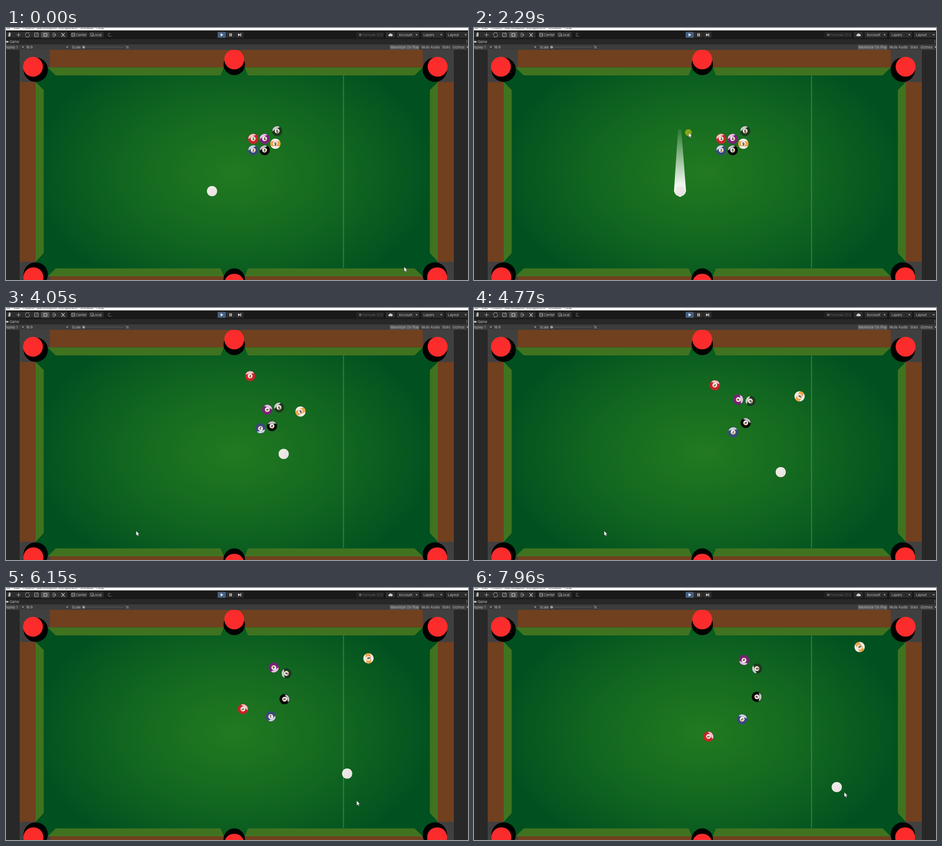
These frames come from a looping animation (1012 by 553 pixels, 7.99 s). An HTML page:

```html
<!DOCTYPE html>
<html lang="en">
<head>
<meta charset="utf-8">
<title>Pool table</title>
<style>
  html, body { margin: 0; width: 100%; height: 100%; overflow: hidden; background: #282828; }
  svg { display: block; width: 100vw; height: 100vh; }
  text { font-family: Inter, "Open Sans", sans-serif; }
  .ui { font-size: 7.5px; }
  .num { font-size: 7px; font-weight: 700; text-anchor: middle; fill: #151515; }
</style>
</head>
<body>
<svg viewBox="0 0 1012 553" preserveAspectRatio="none">
  <defs>
    <radialGradient id="felt" gradientUnits="userSpaceOnUse" r="1" cx="0" cy="0" gradientTransform="translate(500 317) scale(450 300)">
      <stop offset="0" stop-color="#227a20"/>
      <stop offset=".5" stop-color="#136820"/>
      <stop offset="1" stop-color="#005020"/>
    </radialGradient>
    <linearGradient id="gloss" x1="0" y1="0" x2=".7" y2="1">
      <stop offset="0" stop-color="#fff" stop-opacity=".5"/>
      <stop offset=".4" stop-color="#fff" stop-opacity=".8"/>
      <stop offset="1" stop-color="#fff" stop-opacity=".25"/>
    </linearGradient>
    <linearGradient id="disc" x1="0" y1="0" x2="1" y2="1">
      <stop offset=".5" stop-color="#faf3ea"/>
      <stop offset="1" stop-color="#eeb36c"/>
    </linearGradient>
    <linearGradient id="cueFill" x1="0" y1="0" x2="1" y2="1">
      <stop offset="0" stop-color="#f1eeec"/>
      <stop offset="1" stop-color="#e6e0de"/>
    </linearGradient>
    <linearGradient id="fade">
      <stop offset="0" stop-color="#fff"/>
      <stop offset=".2" stop-color="#fff" stop-opacity=".92"/>
      <stop offset="1" stop-color="#fff" stop-opacity=".08"/>
    </linearGradient>
    <clipPath id="round"><circle r="11.2"/></clipPath>
  </defs>
  <g id="table"></g>
  <g id="editor"></g>
  <path id="aim" fill="url(#fade)"/>
  <g id="balls"></g>
  <circle id="dot" r="7.4" fill="#86a616"/>
  <path id="cursor" d="M0 0V10.6L2.4 8.4L4.1 12.1L5.8 11.3L4.2 7.7H7.4Z" fill="#fff" stroke="#111" stroke-width=".5"/>
</svg>
<script>
const LOOP = 7990, DRAG = 0.00047;      // drag per ms
const PRESS = 1060, RELEASE = 3278;
const CUE = { x: 451.3, y: 358 };
const TOP_WALL = 115.5, BOUNCE = 0.81;
const $ = id => document.getElementById(id);

function add(parent, tag, attrs, text) {
  const el = document.createElementNS('http://www.w3.org/2000/svg', tag);
  for (const k in attrs) el.setAttribute(k, attrs[k]);
  if (text) el.textContent = text;
  return parent.appendChild(el);
}
const rect = (p, x, y, width, height, fill, rx = 0) => add(p, 'rect', { x, y, width, height, fill, rx });
const circle = (p, cx, cy, r, fill) => add(p, 'circle', { cx, cy, r, fill });
const shape = (p, d, fill) => add(p, 'path', { d, fill });
const line = (p, d, stroke = '#b8b8b8', width = 1) =>
  add(p, 'path', { d, fill: 'none', stroke, 'stroke-width': width });

function drawTable(g) {
  const wood = '#70401f', cushion = '#40731f';
  rect(g, 0, 48, 1012, 505, '#282828');
  rect(g, 30, 48, 951, 505, '#404040');
  for (const y of [48, 545]) rect(g, 96, y, 817, 39, wood);
  for (const x of [30, 946]) rect(g, x, 118.5, 35, 394.5, wood);
  rect(g, 65, 86.5, 881, 458.5, 'url(#felt)');
  rect(g, 738, 104, 2.5, 423, 'rgba(255,255,255,.17)');

  for (const [outer, inner] of [[86.5, 104], [545, 527.5]])
    shape(g, `M91 ${outer}H477L470 ${inner}H109Z M523 ${outer}H913L895 ${inner}H530Z`, cushion);
  for (const [outer, inner] of [[65, 82.5], [946, 928.5]])
    shape(g, `M${outer} 118.5L${inner} 136V494L${outer} 513Z`, cushion);

  const pocket = (x, y, r, dx, dy) => {
    circle(g, x, y, r, '#000');
    circle(g, x + dx, y + dy, 21.8, '#fd2c2c');
  };
  for (const side of [-1, 1]) {
    const x = 502.2 + side * 437.2;
    pocket(x, 91.5, 26.7, side * 6, -6.5);
    pocket(x, 541, 26.7, side * 5, 6);
  }
  pocket(500, 80, 23.5, 0, -11);
  pocket(500, 551, 23.5, 0, 10);
}

function drawEditor(g) {
  const label = (x, y, s, fill = '#c0c0c0') => add(g, 'text', { x, y, class: 'ui', fill }, s);
  const arrow = (x, y) => shape(g, `M${x - 2.3} ${y - 1.2}h4.6l-2.3 2.6Z`, '#c0c0c0');
  const button = (x, w, fill = '#2d2d2d') => rect(g, x, 8.5, w, 13, fill, 1.5);
  const menu = (x, s) => { button(x, 49); label(x + 4.5, 17.7, s); arrow(x + 43.5, 15); };

  rect(g, 0, 0, 1012, 5.5, '#fff');
  label(-3, 2.2, 'File', '#222');
  label(17, 2.2, 'Edit', '#222');
  label(38, 2.2, 'Assets', '#222');
  label(67, 2.2, 'GameObject', '#222');
  label(115, 2.2, 'Component', '#222');
  label(163, 2.2, 'Window', '#222');
  label(198, 2.2, 'Help', '#222');
  rect(g, 0, 5.5, 1012, 19, '#191919');
  rect(g, 0, 24.5, 1012, 11.5, '#282828');
  rect(g, 0, 36, 1012, 12, '#3c3c3c');

  // transform tools
  button(0, 135);
  button(77, 18, '#505050');
  shape(g, 'M4 14l2 1v-5h4v7l-2 2H6Z', '#b8b8b8');
  line(g, 'M23 15h9M27.5 10.5v9');
  line(g, 'M43 16a4 4 0 0 1 7-4v-2M51 14a4 4 0 0 1-7 4v2');
  line(g, 'M62.5 11h8v8h-8ZM65 16.5l4-4');
  line(g, 'M83 12h6.5v6H83Z', '#ddd');
  line(g, 'M102 12a4 4 0 1 1 0 6M101 15h9');
  line(g, 'M121.5 11l7 8M128.5 11l-7 8', '#b8b8b8', 1.5);
  button(141, 38);
  line(g, 'M144 11.5h6.5v7H144ZM144 15h6.5');
  label(153, 17.7, 'Center');
  button(181, 33);
  line(g, 'M185 12.5l3-1.5 3 1.5v4l-3 2-3-2ZM188 14v4.5', '#b8b8b8', .8);
  label(190.5, 17.7, 'Local');
  line(g, 'M224 12h5M224 12v6h7', '#777');

  // play controls
  button(463.5, 18, '#466080');
  button(482.5, 18.5);
  button(502, 18.5);
  shape(g, 'M470 11.5l6 3.5-6 3.5Z', '#e4e4e4');
  line(g, 'M490.4 11.7v6.6M493.6 11.7v6.6', '#e4e4e4', 1.8);
  shape(g, 'M508.5 11.7l5 3.3-5 3.3ZM513.5 11.7h1.5v6.6h-1.5Z', '#e4e4e4');

  button(767, 60, '#222');
  circle(g, 776, 15, 3, '#5d5d5d');
  label(780.5, 17.7, 'Fernoak VCS', '#5d5d5d');
  button(832, 20);
  shape(g, 'M839.5 18a2 2 0 0 1 0-4 3 3 0 0 1 5.5-.5 2.3 2.3 0 0 1 .5 4.5Z', '#d0d0d0');
  menu(856, 'Account');
  menu(910, 'Layers');
  menu(963.5, 'Layout');

  // game tab and its toolbar
  add(g, 'ellipse', { cx: 2.5, cy: 30.3, rx: 3.2, ry: 2, fill: '#c0c0c0' });
  label(8, 33, 'Game');
  for (const y of [27.5, 30, 32.5]) circle(g, 1009.5, y, .7, '#c0c0c0');
  rect(g, 841, 36.5, 64, 11.5, '#505050');
  label(-5.5, 44.7, 'Display 1');
  label(44, 44.7, '16:9');
  label(144, 44.7, 'Scale');
  label(262, 44.7, '1x');
  label(842, 44.7, 'Maximize On Play');
  label(910, 44.7, 'Mute Audio');
  label(955, 44.7, 'Stats');
  label(978, 44.7, 'Gizmos');
  for (const x of [37, 134, 1011]) arrow(x, 42);
  line(g, 'M170 42H258', '#606060');
  circle(g, 170, 42, 3, '#999');
}

// A hit gives the time and how far the ball would roll from there until it stops
const BALLS = [
  { num: '3', color: '#c9232b', x: 541.5, y: 243, spin: 100, hits: [{ t: 3545, dx: -32, dy: -443 }] },
  { num: '4', color: '#79207a', x: 566.5, y: 243, spin: 258, hits: [{ t: 3560, dx: 28.5, dy: -97 }] },
  { num: '6', color: '#1d3820', x: 594, y: 226, spin: -95, hits: [{ t: 3740, dx: 30, dy: -57 }] },
  { num: '2', color: '#38497c', x: 541.5, y: 268, spin: -770,
    hits: [{ t: 3540, dx: 217, dy: -271 }, { t: 3620, dx: 43.5, dy: 34.5 }] },
  { num: '8', color: '#050505', x: 566.5, y: 268, spin: 140,
    hits: [{ t: 3595, dx: 274, dy: -157 }, { t: 3650, dx: 53, dy: -29 }] },
  { num: '9', color: '#eda44d', x: 590, y: 254, spin: -140, hits: [{ t: 3608, dx: 292.5, dy: -143 }] },
  { color: 'url(#cueFill)', ...CUE, spin: 0,
    hits: [{ t: RELEASE, dx: 739, dy: -587 }, { t: 3540, dx: 683, dy: -90 }, { t: 3600, dx: 274, dy: 171.5 }] }
];

function makeBall(ball) {
  const { num, color } = ball, striped = num === '9';
  const g = ball.el = add($('balls'), 'g', {});
  circle(g, 0, 0, 11.2, striped ? '#f4efe9' : color);
  if (striped) add(g, 'rect', { x: -12, y: -5.5, width: 24, height: 11, fill: color, 'clip-path': 'url(#round)' });
  if (!num) return;
  if (!striped) shape(g, 'M-10.5 1A10.5 10.5 0 0 1 6-8.7Q-1-5-10.5 1Z', 'url(#gloss)');
  circle(g, 0, 0, 5.3, 'url(#disc)');
  add(g, 'text', { class: 'num', y: 2.5 }, num);
  if (num === '6' || striped) line(g, 'M-2.2 3.6h4.4', '#151515', .7);
}

// Share of the full roll covered after some time under drag
const rolled = ms => 1 - Math.exp(-DRAG * Math.max(0, ms));

function placeBall({ el, x, y, spin, hits }, t) {
  hits.forEach(({ t: from, dx, dy }, i) => {
    const until = i + 1 < hits.length ? Math.min(t, hits[i + 1].t) : t;
    x += dx * rolled(until - from);
    y += dy * rolled(until - from);
  });
  if (y < TOP_WALL) y = TOP_WALL + (TOP_WALL - y) * BOUNCE;
  el.setAttribute('transform', `translate(${x} ${y}) rotate(${spin * rolled(t - hits[0].t)})`);
}

const smooth = u => u * u * (3 - 2 * u);
const easeOut = u => u * (2 - u);

// Circling the pointer around the cue ball, slowly gaining speed
function sweep(t) {
  const s = (t - 1690) / 1000, a = (144 + 215 * s + 55 * s * s) * Math.PI / 180;
  return [418 + 133 * Math.cos(a), 361 + 143 * Math.sin(a)];
}

const MOVES = [
  { from: 30, to: 370, end: [434, 386] },
  { from: 850, to: 1000, end: [450, 359] },
  { from: 1100, to: 1600, end: [320, 439] },
  { from: 1660, to: 2800, path: sweep },
  { from: 2800, to: 2920, end: [291, 490], ease: easeOut },
  { from: 3110, to: 3200, end: [285, 489] },
  { from: 5760, to: 6150, end: [768, 466.5] },
  { from: 6150, to: 6300, end: [806, 447.5] },
  { from: 7700, to: 7880, end: [811, 448] }
];

function mouseAt(t) {
  let p = [872, 524];
  for (const { from, to, end, path, ease = smooth } of MOVES) {
    if (t < from) break;
    const now = Math.min(t, to), u = ease((now - from) / (to - from));
    p = path ? path(now) : p.map((v, i) => v + (end[i] - v) * u);
  }
  return p;
}

function drawAim(t) {
  const on = t >= PRESS && t < RELEASE;
  $('aim').style.display = $('dot').style.display = on ? '' : 'none';
  if (!on) return;
  const [x, y] = mouseAt(t);
  $('dot').setAttribute('transform', `translate(${x - .5} ${y})`);
  // the band follows one tick behind the pointer
  const [bx, by] = mouseAt(t - 32), dx = bx - CUE.x, dy = by - CUE.y;
  const len = Math.hypot(dx, dy), turn = Math.atan2(dy, dx) * 180 / Math.PI;
  $('aim').setAttribute('d', `M0-13.2L${len}-3.5V3.5L0 13.2L-5.5 11L-9.5 7L-12.8 0L-9.5-7L-5.5-11Z`);
  $('aim').setAttribute('transform', `translate(${CUE.x} ${CUE.y}) rotate(${turn})`);
}

drawTable($('table'));
drawEditor($('editor'));
BALLS.forEach(makeBall);
const start = performance.now();

function frame() {
  const t = Math.max(0, performance.now() - start) % LOOP;
  for (const ball of BALLS) placeBall(ball, t);
  drawAim(t);
  $('cursor').setAttribute('transform', `translate(${mouseAt(t)})`);
  requestAnimationFrame(frame);
}
frame();
</script>
</body>
</html>
```
